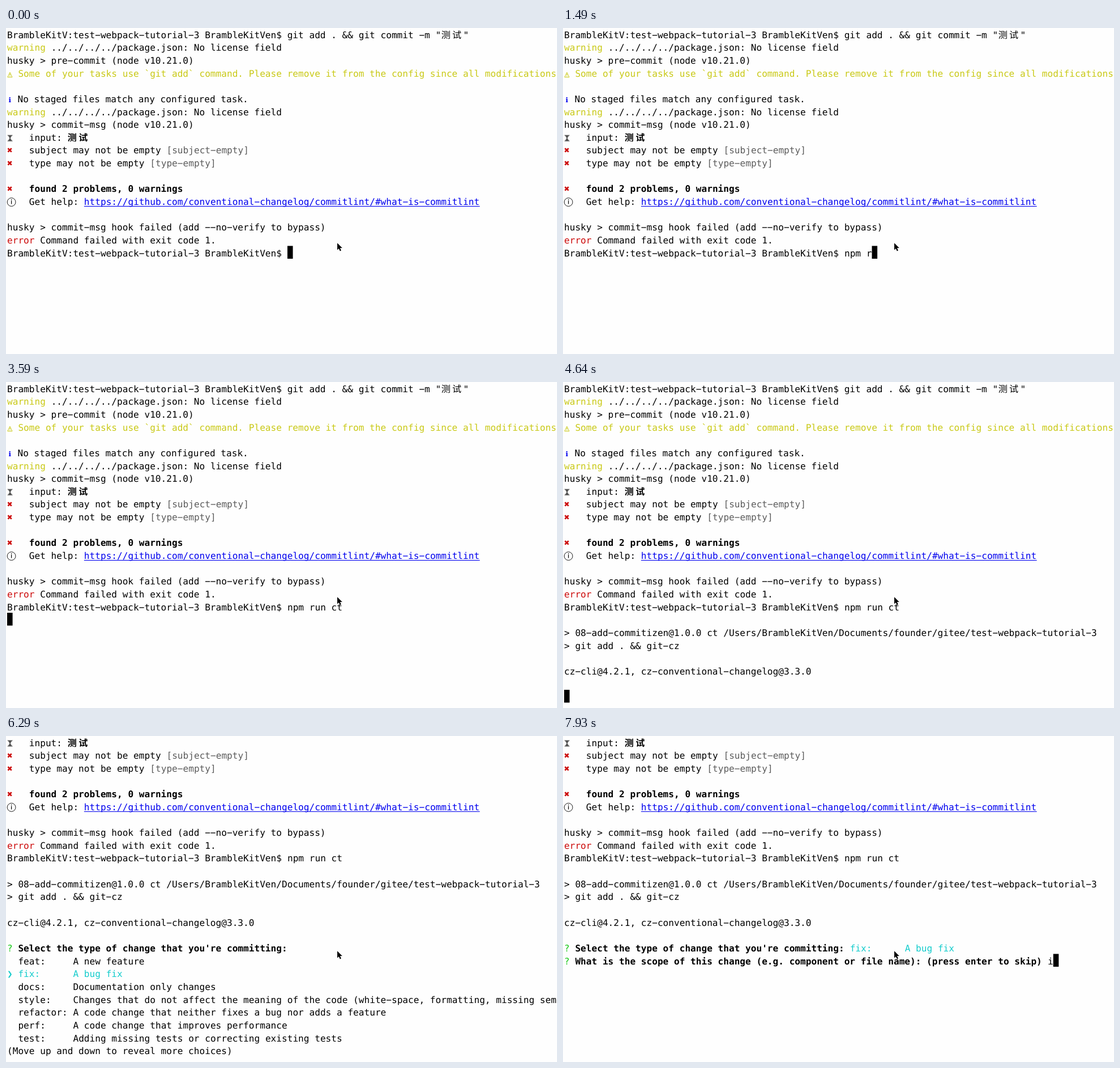
An HTML page for the animation above (8000 ms loop, 973 by 575 pixels).

```html
<!DOCTYPE html>
<html lang="en">
<head>
<meta charset="utf-8">
<title>Terminal session</title>
<style>
  html, body { margin: 0; width: 100%; height: 100%; overflow: hidden; background: #fefefe; }
  svg { display: block; width: 973px; height: 575px; }
  text {
    font: 16.12px "DejaVu Sans Mono", Menlo, monospace;
    white-space: pre;
    text-rendering: geometricPrecision;
    fill: #000;
  }
  .bold { font-weight: bold; }
  .yellow { fill: #c9c916; }
  .red { fill: #cc0a0a; }
  .green { fill: #14c814; }
  .cyan { fill: #14cccc; }
  .grey { fill: #5c5c5c; }
  .link { fill: #0000ee; }
  .han { font-family: "Noto Sans CJK SC", "Noto Sans CJK", sans-serif; letter-spacing: 3.3px; }
  .info { font: bold 12px "DejaVu Serif", serif; fill: #0000ee; }
  .tiny { font-size: 11px; }
</style>
</head>
<body>
<svg viewBox="0 0 973 575">
  <g id="log"><rect id="caret" width="9.6" height="22.6"/></g>
  <path d="M585 379.3v12.2l2.8-2.6 2 4.5 2.1-.9-2-4.4h3.9z" stroke="#fff" stroke-width="1.4" paint-order="stroke"/>
</svg>
<script>
const LOOP = 8000, CELL = 9.705, LINE = 22.65, LEFT = 2, BASE = 17.6;
const RUN = 4040, READY = 4640, MENU = 4790, DOWN = 6290, SCOPE = 6590;
const USER = 'BrambleKitVen', DIR = 'test-webpack-tutorial-3';
const PROMPT = `BrambleKitV:${DIR} ${USER}$ `;
const log = document.getElementById('log'), caret = document.getElementById('caret');
const timed = [];

const colX = col => LEFT + col * CELL;
const rowY = row => BASE + row * LINE;
// The terminal face has wide hyphens.
const wide = s => s.replace(/-/g, '\u2212');

function add(tag, attrs, from = 0, to = LOOP) {
  const el = document.createElementNS('http://www.w3.org/2000/svg', tag);
  for (const k in attrs) el.setAttribute(k, attrs[k]);
  log.append(el);
  if (from > 0 || to < LOOP) timed.push({ el, from, to });
  return el;
}

function put(row, col, str, cls = '', from, to) {
  const el = add('text', { x: colX(col), y: rowY(row), class: cls }, from, to);
  el.textContent = wide(str);
  return el;
}

function mark(row, d, color, width = 1) {
  add('path', {
    d, transform: `translate(${LEFT} ${rowY(row)})`,
    fill: 'none', stroke: color, 'stroke-width': width
  });
}

// Failed commit
put(0, 0, PROMPT + 'git add . && git commit -m "');
put(0, 79, '测试', 'han');
put(0, 83, '"');
for (const row of [1, 6]) {
  put(row, 0, 'warning', 'yellow');
  put(row, 8, '../../../../package.json: No license field');
}
put(2, 0, 'husky > pre-commit (node v10.21.0)');
mark(3, 'M.8 1.2 4.9-7.2 9 1.2zM4.9-4.6v3.1M4.9-.7v1', '#c9c916');
put(3, 2, 'Some of your tasks use `git add` command. Please remove it from the config since all modifications', 'yellow');
put(5, 0.25, 'i', 'info');
put(5, 1.9, 'No staged files match any configured task.');
put(7, 0, 'husky > commit-msg (node v10.21.0)');
mark(8, 'M.6-9.6H9.6M.6.4H9.6M2-9.6 8.2.4M8.2-9.6 2 .4', '#555', 1.1);
add('path', { d: 'M2-9.6H8.2L5.1-4.6 8.2.4H2L5.1-4.6z', fill: '#555', transform: `translate(${LEFT} ${rowY(8)})` });
put(8, 4, 'input:');
put(8, 11, '测试', 'han bold');
for (const row of [9, 10, 12]) put(row, 0, '✖', 'red');
put(9, 4, 'subject may not be empty');
put(9, 29, '[subject-empty]', 'grey');
put(10, 4, 'type may not be empty');
put(10, 26, '[type-empty]', 'grey');
put(12, 4, 'found 2 problems, 0 warnings', 'bold');
add('circle', { cx: 9.6, cy: rowY(13) - 5, r: 7.4, fill: 'none', stroke: '#000', 'stroke-width': .9 });
add('path', { d: 'M9.6 304.6v6M9.6 302v1.5', fill: 'none', stroke: '#000', 'stroke-width': 1.2 });
put(13, 4, 'Get help:');
const url = 'https://github.com/conventional-changelog/commitlint/#what-is-commitlint';
put(13, 14, url, 'link');
add('rect', { x: colX(14), y: rowY(13) + 1.9, width: url.length * CELL, height: 1.1, class: 'link' });
put(15, 0, 'husky > commit-msg hook failed (add --no-verify to bypass)');
put(16, 0, 'error', 'red');
put(16, 6, 'Command failed with exit code 1.');

// Typed command and its output
put(17, 0, PROMPT);
const typed = put(17, PROMPT.length, '');
put(19, 0, `> 08-add-commitizen@1.0.0 ct /Users/${USER}/Documents/founder/gitee/${DIR}`, '', RUN);
put(20, 0, '> git add . && git-cz', '', RUN);
put(22, 0, 'cz-cli@4.2.1, cz-conventional-changelog@3.3.0', '', READY);

// Menu of change types
put(24, 0, '?', 'green', MENU);
put(24, 2, "Select the type of change that you're committing:", 'bold', MENU);
put(24, 52, '(Use arrow keys)', '', MENU, DOWN);
const menu = [
  ['feat:', 'A new feature'],
  ['fix:', 'A bug fix'],
  ['docs:', 'Documentation only changes'],
  ['style:', 'Changes that do not affect the meaning of the code (white-space, formatting, missing sem'],
  ['refactor:', 'A code change that neither fixes a bug nor adds a feature'],
  ['perf:', 'A code change that improves performance'],
  ['test:', 'Adding missing tests or correcting existing tests']
];
const option = (i, cls, from, to) => {
  const [name, note] = menu[i];
  if (cls) put(25 + i, 0, '❯', cls, from, to);
  put(25 + i, 2, name, cls, from, to);
  put(25 + i, 12, note, cls, from, to);
};
menu.forEach((_, i) => {
  if (i > 1) return option(i, '', MENU, SCOPE);
  option(i, i ? '' : 'cyan', MENU, DOWN);
  option(i, i ? 'cyan' : '', DOWN, SCOPE);
});
put(32, 0, '(Move up and down to reveal more choices)', '', MENU, SCOPE);

// Answer and next question
put(24, 52, menu[1][0], 'cyan', SCOPE);
put(24, 62, menu[1][1], 'cyan', SCOPE);
put(25, 0, '?', 'green', SCOPE);
put(25, 2, 'What is the scope of this change (e.g. component or file name): (press enter to skip)', 'bold', SCOPE);
put(25, 88, 'i', '', 7930);

const command = 'npm run ct';
const keys = [750, 900, 1050, 1340, 1490, 1640, 1790, 1940, 3290, 3440];
const END = PROMPT.length;
// Time, then caret row and column; no row means hidden.
const caretSteps = [
  [0, 17, END], [300],
  ...keys.slice(0, 8).map((t, i) => [t, 17, END + i + 1]), [2840],
  ...keys.slice(8).map((t, i) => [t, 17, END + i + 9]),
  [3590, 18, 0], [RUN, 22, 0], [READY, 24, 0], [MENU],
  [SCOPE, 25, 88], [7640], [7930, 25, 89]
];
const show = (el, on) => el.setAttribute('visibility', on ? 'visible' : 'hidden');

function draw(t) {
  log.setAttribute('transform', `translate(0 ${t >= MENU ? -8 * LINE : 0})`);
  for (const { el, from, to } of timed) show(el, t >= from && t < to);
  typed.textContent = command.slice(0, keys.filter(k => k <= t).length);
  const [, row, col] = caretSteps.filter(s => s[0] <= t).pop();
  show(caret, row !== undefined);
  if (row !== undefined) {
    caret.setAttribute('x', colX(col));
    caret.setAttribute('y', row * LINE - .7);
  }
}

const start = performance.now();
function tick() {
  draw((performance.now() - start) % LOOP);
  requestAnimationFrame(tick);
}
tick();
</script>
</body>
</html>
```
